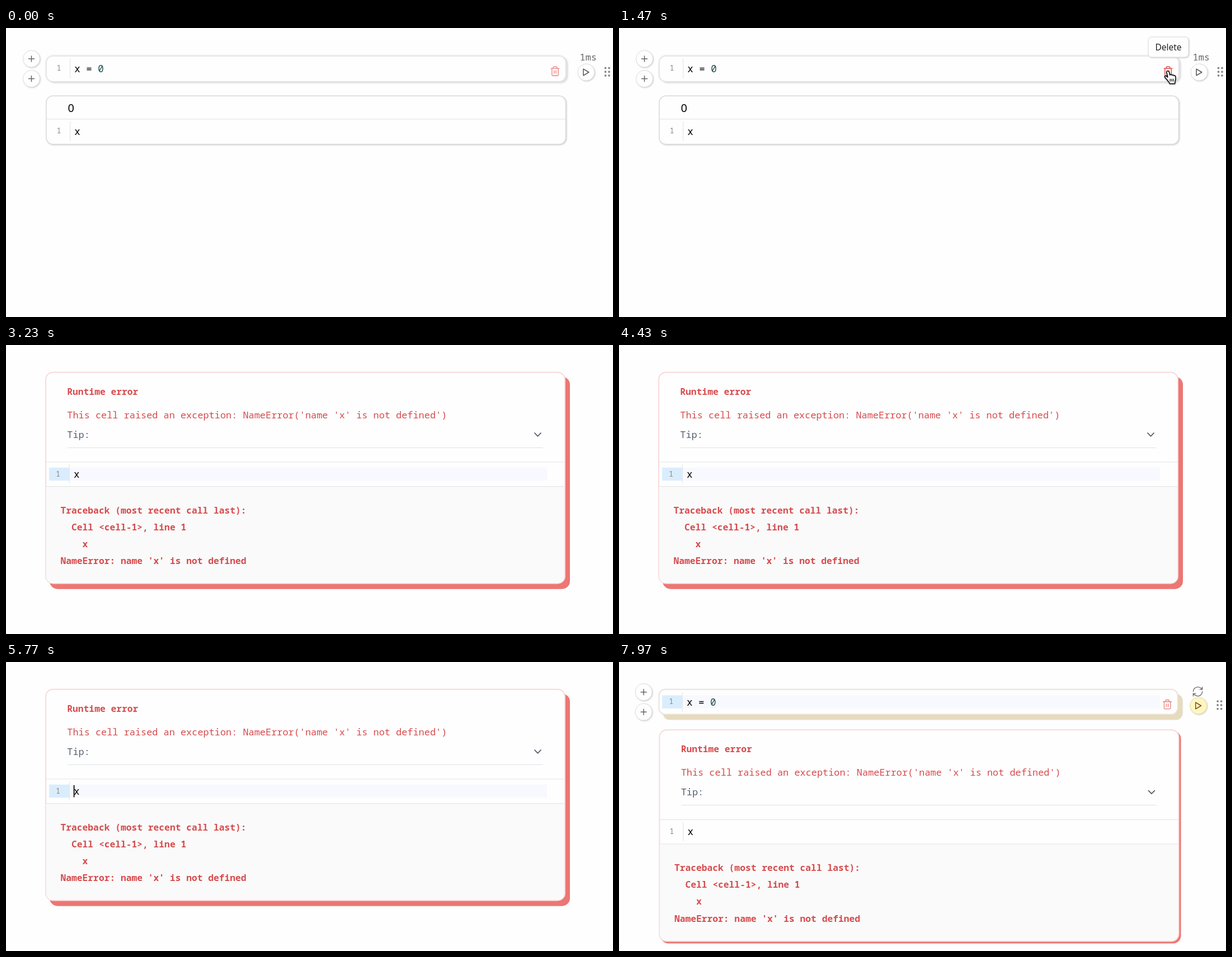
An HTML page that plays this animation: 1085 by 516 pixels, repeating every 8 s.

```html
<!DOCTYPE html>
<html lang="en">
<head>
<meta charset="utf-8">
<title>Notebook cells</title>
<style>
html, body { margin: 0; width: 100%; height: 100%; overflow: hidden; background: #fefefe; }
svg { display: block; }
text { font: 16.9px "Noto Sans Mono", monospace; white-space: pre; }
.code { font-size: 17.5px; }
.num { font-size: 13.5px; fill: #8a8a8a; text-anchor: middle; }
.red { fill: #d64b4d; }
.bold { font-size: 16.3px; font-weight: 600; fill: #d64b4d; }
.sans { font-family: "Noto Sans", sans-serif; }
.line { fill: none; stroke: #e4e6e9; stroke-width: 1.2; }
.icon { fill: none; stroke: #666; stroke-width: 1.5; stroke-linecap: round; stroke-linejoin: round; }
.card { fill: #fefefe; stroke: #dcdcdc; stroke-width: 1.6; }
.button { fill: #fefefe; stroke: #dedede; filter: drop-shadow(1.5px 1.5px 1px #ccc); }
.soft { filter: drop-shadow(1px 1px .8px #ccc); }
.raised { stroke: #e4e4e4; filter: drop-shadow(3px 2.5px .5px #e2e2e2) drop-shadow(0 0 1.5px #ddd); }
.failed { stroke: #f9dada; stroke-width: 2; filter: drop-shadow(8px 9px 0 #ec7673); }
.failed.small { filter: drop-shadow(3.5px 3.5px 0 #ec7673); }
.stale { stroke: #ece5d8; filter: drop-shadow(8.5px 9.5px 0 #e6dbbe) drop-shadow(0 0 1px #ddd); }
#trash { color: #ec918f; }
</style>
</head>
<body>
<svg width="1085" height="516" viewBox="0 0 1085 516">
  <defs>
    <g id="plus">
      <circle class="button" r="15"/>
      <path class="icon" d="M-5 0H5M0-5V5"/>
    </g>
    <g id="adders">
      <use href="#plus" x="45.5" y="55"/>
      <use href="#plus" x="45.5" y="90.5"/>
    </g>
    <path id="dots" d="M1071.5 71.5h0m6.5 0h0m-6.5 6.7h0m6.5 0h0m-6.5 6.7h0m6.5 0h0"
      fill="none" stroke="#888" stroke-width="3.8" stroke-linecap="round"/>
    <path id="play" d="M1032 73.2v11.6l9.8-5.8z" fill="none" stroke-width="1.5" stroke-linejoin="round"/>
    <g id="run">
      <circle class="button" cx="1037" cy="79" r="15"/>
      <use href="#play" stroke="#555"/>
    </g>
    <g id="bin" transform="translate(971.8 67.3) scale(.81)">
      <path fill="none" stroke="currentColor" stroke-width="1.9" stroke-linecap="round" stroke-linejoin="round"
        d="M3 6h18M19 6v14c0 1-1 2-2 2H7c-1 0-2-1-2-2V6M8 6V4c0-1 1-2 2-2h4c1 0 2 1 2 2v2M10 11v6M14 11v6"/>
    </g>
    <g id="assign">
      <path class="line" d="M114.6 55V90"/>
      <text class="num" x="94.5" y="76">1</text>
      <text class="code" x="122.2" y="78.5">x = <tspan fill="#1f4a4c">0</tspan></text>
    </g>
    <g id="active">
      <path fill="#daedfd" d="M77 0h36v23.5H77z"/>
      <path fill="#f7f9fe" d="M113 0h854v23.5H113z"/>
    </g>
    <g id="error">
      <text class="bold" x="109.3" y="89">Runtime error</text>
      <text class="red" x="109.3" y="130.6">This cell raised an exception: NameError('name 'x' is not defined')</text>
      <text x="109.3" y="165.5" font-weight="500" style="fill:#55606f;font-weight:500">Tip:</text>
      <path class="icon" style="stroke:#55606f;stroke-width:1.8" d="M945 157.2l5.5 5.6 5.5-5.6"/>
      <path fill="#fafafa" d="M71.5 253H998V413a12 12 0 0 1-12 12H83.5a12 12 0 0 1-12-12z"/>
      <path class="line" d="M110 183.3H960M72 209H998M72 252.6H998M113.3 213V247"/>
      <text class="num" x="93" y="234.5">1</text>
      <text class="code" x="121" y="236.6">x</text>
      <text class="bold" x="97.5" y="300.8">Traceback (most recent call last):</text>
      <text class="bold" x="97.5" y="330.9">  Cell &lt;cell-1&gt;, line 1</text>
      <text class="bold" x="97.5" y="361">    x</text>
      <text class="bold" x="97.5" y="391.2">NameError: name 'x' is not defined</text>
    </g>
  </defs>

  <g id="before">
    <rect class="card raised" x="72" y="50" width="928.5" height="45.5" rx="12"/>
    <use href="#assign"/>
    <use id="trash" href="#bin"/>
    <use href="#adders"/>
    <text x="1025.5" y="57.5" fill="#666">1ms</text>
    <use href="#run"/>
    <use href="#dots"/>
    <rect class="card soft" x="72" y="121.3" width="928.5" height="86.2" rx="12"/>
    <path class="line" d="M72.5 162.6H1000M114.6 167V201.5"/>
    <text class="sans" x="110.4" y="150" style="font-size:20px">0</text>
    <text class="num" x="94.5" y="188.3">1</text>
    <text class="code" x="122.2" y="191">x</text>
    <g id="tooltip">
      <rect class="card soft" x="946" y="16" width="72" height="36" rx="6" style="stroke-width:1"/>
      <text class="sans" x="982" y="39.5" text-anchor="middle" style="font-size:15.5px" fill="#222">Delete</text>
    </g>
  </g>

  <g id="broken">
    <rect class="card failed" x="71" y="48.7" width="928" height="377" rx="13"/>
    <use href="#active" y="218.7"/>
    <use href="#error"/>
    <path id="caretB" d="M121.6 220v21.5" stroke="#000" stroke-width="1.7"/>
    <g id="hoverB" transform="translate(-1.5 158.3)">
      <use href="#adders"/>
      <use href="#run"/>
      <use href="#dots"/>
    </g>
  </g>

  <g id="restored">
    <rect class="card stale" x="71.7" y="49.3" width="926.8" height="44" rx="11"/>
    <use href="#active" y="59.5"/>
    <use href="#assign" x="-1.3" y="-1"/>
    <path id="caretC" d="M174.6 60.7v21.5" stroke="#000" stroke-width="1.5"/>
    <g transform="translate(1023.7 41.9) scale(.9)">
      <path class="icon" d="M3 12a9 9 0 0 1 9-9 9.75 9.75 0 0 1 6.74 2.74L21 8M21 3v5h-5M21 12a9 9 0 0 1-9 9 9.75 9.75 0 0 1-6.74-2.74L3 16M8 16H3v5"/>
    </g>
    <g transform="translate(-1.3 -1)">
      <circle class="button" cx="1037" cy="79" r="15" style="fill:#fdf6c1;stroke:#e6dda6"/>
      <use href="#play" stroke="#7d4a1e"/>
    </g>
    <g id="hoverC" transform="translate(-1.4 -1.3)">
      <use href="#adders"/>
      <use href="#bin" color="#ec918f"/>
      <use href="#dots"/>
    </g>
    <rect class="card failed small" x="72.3" y="121.2" width="928.2" height="377.3" rx="13"/>
    <use href="#error" x="1.4" y="72.4"/>
  </g>

  <g id="cursor" style="filter:drop-shadow(0 1px 1px #0005)">
    <path id="arrow" d="M0 0V18.5L4.3 14.6 7.4 22 10.6 20.6 7.5 13.4H13.2z" stroke="#fff" stroke-width="1.3"/>
    <g id="hand" fill="#fff" stroke="#000" stroke-width="1.5" stroke-linejoin="round" stroke-linecap="round">
      <path d="M-2.2 1.5C-2.2-.6 1.6-.8 2.2 1.2L3.8 7C4.5 5.6 7 5.8 7.4 7.4 8.2 6.2 10.3 6.6 10.7 8.2 11.8 7.4 13.6 8 13.8 9.8 14.2 12 14.3 15 13 18L12.6 22.5H3.4C3 20 0 17.5-2 14.8-3.5 12.8-6.2 11-5.6 9.4-4.8 7.6-2 9-.2 11z"/>
      <path d="M4.2 14v4M7 14v4M9.8 14v4" stroke-width="1.2"/>
    </g>
  </g>
</svg>
<script>
const LOOP = 8000, DELETE = 2000, LEAVE = 2950, RESTORE = 5800, HOVER = 7200;
const el = id => document.getElementById(id);
const show = (id, on) => { el(id).style.display = on ? '' : 'none'; };
const blink = time => time >= 0 && time % 1200 < 600;

function draw(t) {
  const before = t < DELETE, restored = t >= RESTORE;
  show('before', before);
  show('broken', !before && !restored);
  show('restored', restored);

  // The pointer glides in from the right and slows down on the bin.
  const left = 1 - Math.min(1, Math.max(0, (t - 100) / 800));
  const x = 981 + 107 * left ** 1.5, y = 77 + 53 * left ** 1.2;
  const onBin = before && x < 997;
  el('cursor').setAttribute('transform', `translate(${x} ${y})`);
  show('cursor', t < LEAVE);
  show('hand', onBin);
  show('arrow', !onBin);
  el('trash').style.color = onBin ? '#e2504f' : '#ec918f';
  show('tooltip', t >= 1080 && t < 1870);

  show('hoverB', t < LEAVE);
  show('caretB', blink(t - 2050));
  show('caretC', blink(t - RESTORE));
  show('hoverC', t >= HOVER);
}

function tick() {
  draw(performance.now() % LOOP);
  requestAnimationFrame(tick);
}
tick();
</script>
</body>
</html>
```
